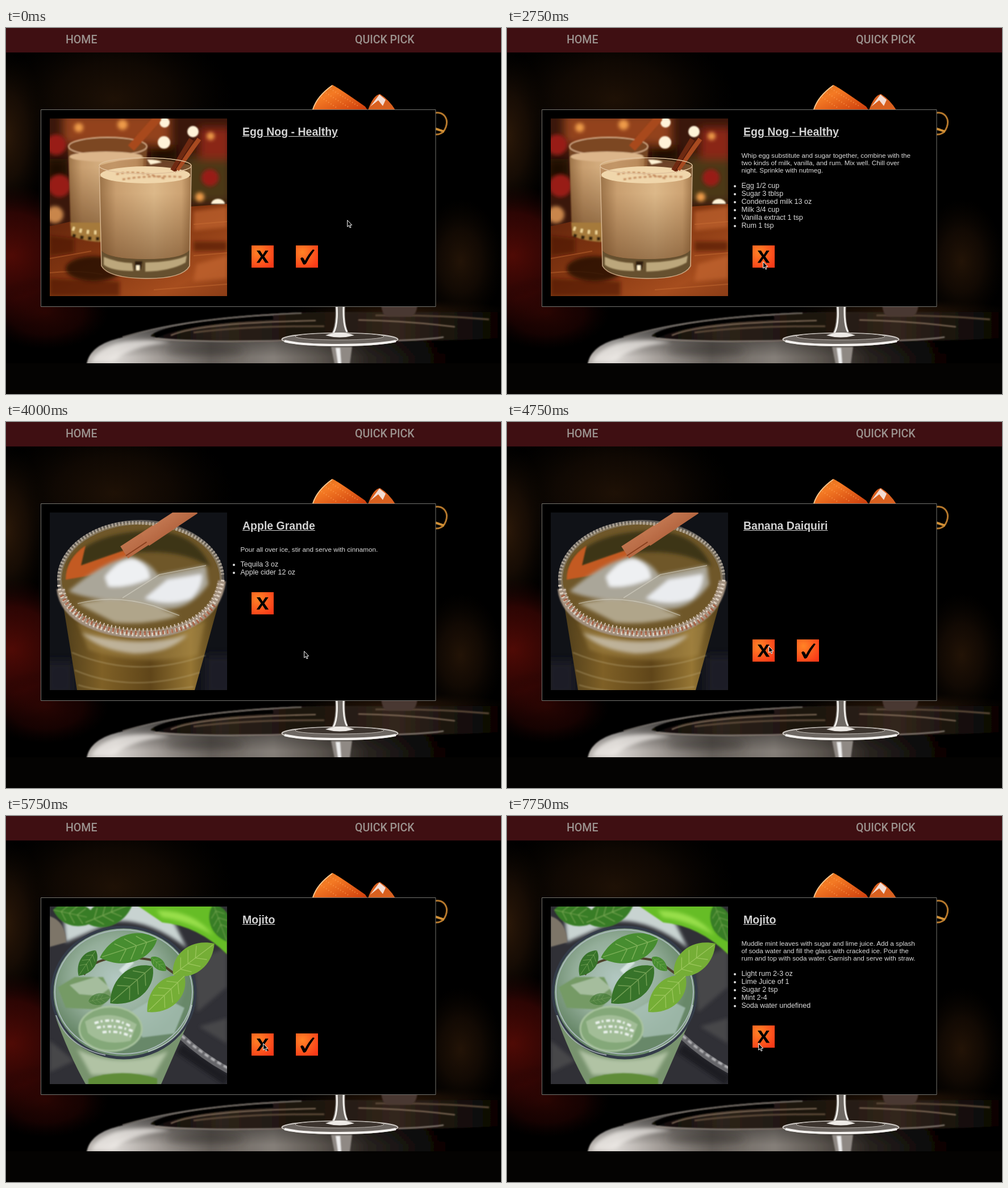
These frames come from a looping animation (871x643 px, 8000 ms). An HTML page:

```html
<!DOCTYPE html>
<html lang="en">
<head>
<meta charset="utf-8">
<title>Cocktail picker</title>
<style>
html, body { margin: 0; width: 100%; height: 100%; overflow: hidden; background: #000; }
#stage { position: relative; width: 871px; height: 643px; overflow: hidden; font-family: Arial, "Liberation Sans", sans-serif; color: #dcdcdc; }
svg { display: block; }
#cursor { position: absolute; left: 0; top: 0; overflow: visible; }
nav span { position: absolute; top: 9px; font: 500 19.5px/23px Roboto, sans-serif; color: #9b928e; white-space: nowrap; }
h2 { position: absolute; left: 416px; top: 171px; margin: 0; font-size: 19.5px; line-height: 22px; text-decoration: underline; color: #d2d2d2; white-space: nowrap; }
.recipe { position: absolute; left: 412.5px; top: 216.5px; white-space: nowrap; }
.recipe p { margin: 0 0 13.5px; font-size: 11.7px; line-height: 13.35px; }
.recipe ul { margin: 0; padding: 0; font-size: 12.5px; line-height: 14px; }

.anim { animation: 8s step-end infinite; }
.show { opacity: 0; }
.egg { animation-name: egg; }
.egg-recipe { animation-name: egg-recipe; }
.apple-pic { animation-name: apple-pic; }
.apple-title { animation-name: apple-title; }
.apple-recipe { animation-name: apple-recipe; }
.banana-pic { animation-name: banana-pic; }
.banana-title { animation-name: banana-title; }
.mojito { animation-name: mojito; }
.mojito-recipe { animation-name: mojito-recipe; }
.check { animation-name: check; }
.close { animation-name: close; }
#cursor { animation-name: cursor; }
@keyframes egg { 0% { opacity: 1 } 40.625% { opacity: 0 } }
@keyframes egg-recipe { 28.125% { opacity: 1 } 40.625% { opacity: 0 } }
@keyframes apple-pic { 40.625% { opacity: 1 } 62.5% { opacity: 0 } }
@keyframes apple-title { 40.625% { opacity: 1 } 56.25% { opacity: 0 } }
@keyframes apple-recipe { 50% { opacity: 1 } 56.25% { opacity: 0 } }
@keyframes banana-pic { 62.5% { opacity: 1 } 71.875% { opacity: 0 } }
@keyframes banana-title { 56.25% { opacity: 1 } 71.875% { opacity: 0 } }
@keyframes mojito { 71.875%, 100% { opacity: 1 } }
@keyframes mojito-recipe { 87.5%, 100% { opacity: 1 } }
@keyframes check {
  0%, 40.625%, 56.25% { opacity: 1 }
  28.125%, 50%, 87.5%, 100% { opacity: 0 }
}
@keyframes close {
  0%, 56.25% { transform: none }
  50% { transform: translateY(-83px) }
  87.5%, 100% { transform: translateY(-14px) }
}
@keyframes cursor {
  0% { transform: translate(600px, 337px) }
  3.125% { transform: translate(584px, 350px) }
  6.25% { transform: translate(540px, 378px) }
  9.375% { transform: translate(486px, 398px) }
  12.5% { transform: translate(455px, 406px) }
  18.75% { transform: translate(474px, 406px) }
  21.875% { transform: translate(510px, 407px) }
  25%, 28.125% { transform: translate(522px, 407px) }
  31.25% { transform: translate(447px, 409px) }
  34.375% { transform: translate(450px, 410px) }
  43.75% { transform: translate(492px, 406px) }
  46.875%, 50% { transform: translate(524px, 402px) }
  53.125% { transform: translate(470px, 340px) }
  56.25% { transform: translate(450px, 322px) }
  59.375% { transform: translate(460px, 393px) }
  62.5% { transform: translate(454px, 398px) }
  65.625% { transform: translate(452px, 399px) }
  75% { transform: translate(456px, 400px) }
  78.125% { transform: translate(478px, 401px) }
  81.25% { transform: translate(508px, 401px) }
  84.375%, 87.5% { transform: translate(525px, 401px) }
  90.625% { transform: translate(492px, 402px) }
  93.75% { transform: translate(452px, 400px) }
  96.875%, 100% { transform: translate(442px, 399px) }
}
</style>
</head>
<body>
<div id="stage">
<svg width="871" height="643" viewBox="0 0 871 643">
  <defs>
    <filter id="b1" x="-20%" y="-20%" width="140%" height="140%"><feGaussianBlur stdDeviation="1"/></filter>
    <filter id="b3" x="-60%" y="-60%" width="220%" height="220%"><feGaussianBlur stdDeviation="3"/></filter>
    <filter id="b8" x="-100%" y="-100%" width="300%" height="300%"><feGaussianBlur stdDeviation="8"/></filter>
    <radialGradient id="brown"><stop offset="0" stop-color="#2b1808"/><stop offset=".5" stop-color="#1a0e05" stop-opacity=".85"/><stop offset="1" stop-color="#0d0702" stop-opacity="0"/></radialGradient>
    <radialGradient id="red"><stop offset="0" stop-color="#4f0a05"/><stop offset=".6" stop-color="#370604" stop-opacity=".8"/><stop offset="1" stop-color="#1c0302" stop-opacity="0"/></radialGradient>
    <linearGradient id="silver">
      <stop offset="0" stop-color="#b5b0ab"/><stop offset=".07" stop-color="#d9d5d1"/><stop offset=".17" stop-color="#a39d98"/><stop offset=".3" stop-color="#68625d"/>
      <stop offset=".45" stop-color="#857f79"/><stop offset=".56" stop-color="#5b554f"/><stop offset=".68" stop-color="#28231f"/><stop offset=".84" stop-color="#080605"/><stop offset="1" stop-color="#000"/>
    </linearGradient>
    <linearGradient id="shade" x2="0" y2="1"><stop offset=".1" stop-opacity=".75"/><stop offset=".85" stop-opacity="0"/></linearGradient>
    <linearGradient id="tray">
      <stop offset="0" stop-color="#0b0705"/><stop offset=".2" stop-color="#2d231b"/><stop offset=".45" stop-color="#1b130d"/>
      <stop offset=".7" stop-color="#33261c"/><stop offset="1" stop-color="#050302"/>
    </linearGradient>
    <radialGradient id="orange" cx=".3" cy=".3" r=".85"><stop offset="0" stop-color="#ff8426"/><stop offset="1" stop-color="#fb3a18"/></radialGradient>
    <linearGradient id="peel" x2="1" y2="1"><stop offset="0" stop-color="#d8701c"/><stop offset=".35" stop-color="#f47a24"/><stop offset="1" stop-color="#cc3c0c"/></linearGradient>
    <linearGradient id="wood" y2="1"><stop offset="0" stop-color="#5e230c"/><stop offset=".45" stop-color="#833611"/><stop offset=".8" stop-color="#a64d1e"/><stop offset="1" stop-color="#8a3c16"/></linearGradient>
    <linearGradient id="nog"><stop offset="0" stop-color="#9c7348"/><stop offset=".18" stop-color="#c99f70"/><stop offset=".6" stop-color="#dcb889"/><stop offset=".9" stop-color="#cda373"/><stop offset="1" stop-color="#a47a4e"/></linearGradient>
    <linearGradient id="dusk" x2="0" y2="1"><stop offset=".2" stop-color="#5c3616" stop-opacity="0"/><stop offset="1" stop-color="#5c3616" stop-opacity=".5"/></linearGradient>
    <linearGradient id="stick" x2="1" y2="1"><stop offset="0" stop-color="#d28a62"/><stop offset="1" stop-color="#a4522e"/></linearGradient>
    <linearGradient id="cider"><stop offset="0" stop-color="#4d3c1a"/><stop offset=".25" stop-color="#7f6026"/><stop offset=".55" stop-color="#5f4519"/><stop offset=".8" stop-color="#967634"/><stop offset="1" stop-color="#463514"/></linearGradient>
    <linearGradient id="cream"><stop offset="0" stop-color="#d0b184"/><stop offset=".35" stop-color="#ecd8b2"/><stop offset="1" stop-color="#cfae80"/></linearGradient>
    <linearGradient id="plank"><stop offset="0" stop-color="#6f3a20"/><stop offset=".5" stop-color="#5a2a16"/><stop offset="1" stop-color="#7b4324"/></linearGradient>
    <radialGradient id="mint" cx=".45" cy=".4"><stop offset="0" stop-color="#b3c8c2"/><stop offset=".6" stop-color="#94ae9a"/><stop offset="1" stop-color="#688869"/></radialGradient>
    <pattern id="check-cloth" width="9" height="9" patternUnits="userSpaceOnUse" patternTransform="rotate(32)">
      <path fill="#e6f0f0" d="M0 0h9v9H0z"/><path fill="#69bccb" d="M0 0h4v4H0z"/>
    </pattern>
    <g id="leaf">
      <path fill="currentColor" d="M0 0C18-32 68-38 100 0C72 32 24 34 0 0Z"/>
      <path fill="none" stroke="#dff0a0" stroke-opacity=".35" stroke-width="1.5" d="M0 0H96M18 0l14-18M36 0l16-21M54 0l16-18M18 0l14 17M36 0l16 19M54 0l16 16"/>
    </g>
    <path id="button" fill="url(#orange)" d="M432 382h39v39h-39z"/>
  </defs>

  <!-- bar photo -->
  <g>
    <path d="M0 0h871v643H0z"/>
    <ellipse cx="190" cy="125" rx="210" ry="130" fill="url(#brown)" opacity=".7"/>
    <ellipse cx="0" cy="190" rx="75" ry="150" fill="url(#brown)"/>
    <ellipse cx="10" cy="400" rx="130" ry="125" fill="url(#red)"/>
    <ellipse cx="70" cy="500" rx="110" ry="65" fill="url(#red)" opacity=".5"/>
    <ellipse cx="800" cy="410" rx="75" ry="110" fill="url(#brown)" opacity=".8"/>
    <ellipse cx="690" cy="500" rx="200" ry="26" fill="url(#brown)"/>
    <g id="table" filter="url(#b1)">
      <path id="disc" fill="url(#silver)" d="M142 592C145 568 166 552 205 544C290 518 390 505 520 500L871 502V592Z"/>
      <use href="#disc" style="fill:url(#shade)"/>
      <path fill="url(#shade)" d="M142 592C145 568 166 552 205 544C290 518 390 505 520 500L871 502V592Z"/>
    </g>
    <path fill="#f0ece8" opacity=".7" filter="url(#b3)" d="M150 588Q160 561 210 551Q250 545 290 553Q220 558 186 588Z"/>
    <path fill="url(#tray)" filter="url(#b1)" d="M254 541C275 522 390 504 560 499H871V545Q740 552 560 549Q300 554 254 541Z"/>
    <g fill="none" filter="url(#b1)">
      <path stroke="#060302" stroke-width="9" d="M262 541C300 523 370 512 470 508"/>
      <path stroke="#8b7461" stroke-width="2" d="M290 540C330 523 420 517 545 514M620 513Q700 514 790 525"/>
      <path stroke="#5b4939" stroke-width="3" d="M330 535Q430 523 560 524M650 505Q740 503 850 512"/>
      <path stroke="#9a8f86" stroke-width="2" d="M262 546Q350 553 490 549M690 549Q740 547 770 543"/>
      <path stroke="#aaa199" stroke-width="2" opacity=".7" d="M205 543C290 518 390 506 520 501"/>
    </g>
    <ellipse cx="350" cy="567" rx="70" ry="9" fill="#2c2724" opacity=".45" filter="url(#b8)"/>
    <path fill="#4a3732" filter="url(#b1)" d="M660 486H724Q722 506 711 507H672Q662 506 660 486Z"/>
    <path fill="#6f6964" d="M579 488H597Q595 522 604 538H572Q581 522 579 488Z"/>
    <path stroke="#f3f0ec" stroke-width="3" fill="none" d="M582 489Q584 522 576 536M594 489Q593 522 600 534"/>
    <ellipse cx="587.5" cy="547" rx="102" ry="11" fill="#6d6762" stroke="#cfcac5" stroke-width="2"/>
    <ellipse cx="587" cy="542" rx="78" ry="6" fill="#3c342e" stroke="#bcb6b0"/>
    <path fill="#eeeae6" d="M562 540Q587 530 613 540Q587 547 562 540Z"/>
    <path stroke="#f5f2ef" stroke-width="4" fill="none" d="M490 550Q520 557 585 557T686 550"/>
    <path fill="#8f8984" filter="url(#b1)" d="M572 560H609L605 590H578Z"/>
    <path fill="#eee" filter="url(#b1)" d="M580 562h8l2 28h-6z"/>
    <path fill="url(#peel)" d="M539 144Q546 120 574 100Q579 101 632 138L636 144Z"/>
    <path stroke="#ff9d50" stroke-width="2" stroke-dasharray="1 4" fill="none" d="M571 107L621 138M563 114L604 140M555 122L583 141"/>
    <path stroke="#f6c58c" stroke-width="2" fill="none" d="M540 143Q547 120 574 101"/>
    <path fill="#d9601f" d="M637 144Q646 118 658 116Q674 126 685 144Z"/>
    <path fill="#f3dcd2" d="M641 138L657 117L668 126L663 137L655 127Z"/>
    <path fill="none" stroke="#b5782c" stroke-width="3" d="M756 149C771 147 779 160 774 174Q769 188 756 187"/>
    <path fill="none" stroke="#d08f35" stroke-width="4" d="M756 177L771 182"/>
    <path fill="#040302" d="M0 589h871v54H0z"/>
    <path fill="#3f0f12" d="M0 0h871v43H0z"/>
  </g>

  <path stroke="#74746f" d="M61.5 143.5h694.500v346H61.500z"/>

  <!-- egg nog -->
  <svg class="anim show egg" x="77" y="159" width="312" height="312" viewBox="77 159 312 312">
    <path fill="#3a170b" d="M77 159h312v312H77z"/>
    <g filter="url(#b8)">
      <path fill="#93431b" d="M100 150H290V205H100z"/>
      <path fill="#4c3713" d="M315 225H395V305H315z"/>
      <path fill="#8a2513" d="M340 175H395V230H340z"/>
      <path fill="#1f0b06" d="M70 230H108V270H70zM255 205H300V235H255z"/>
    </g>
    <g filter="url(#b3)">
      <g fill="#981c18"><circle cx="94" cy="277" r="20"/><circle cx="88" cy="205" r="18"/><circle cx="359" cy="263" r="15"/></g>
      <circle cx="86" cy="328" r="15" fill="#c9864c"/>
      <g fill="#ee9b48"><circle cx="128" cy="175" r="8"/><circle cx="205" cy="170" r="9"/><circle cx="360" cy="190" r="7"/><circle cx="341" cy="297" r="8"/></g>
    </g>
    <path fill="url(#wood)" d="M77 348Q110 342 170 325L389 309V471H77z"/>
    <g filter="url(#b3)">
      <path fill="#c4682f" opacity=".65" d="M330 322L389 314V350L330 356zM335 415L389 400V440L330 445z"/>
      <path fill="#4a1908" opacity=".6" d="M77 365L120 370V395L77 400zM77 440L200 445V471H77zM330 375H389V392H330z"/>
    </g>
    <path stroke="#cc7439" stroke-width="2" opacity=".4" fill="none" d="M77 405L150 392M77 430Q130 425 170 433M330 345L389 340M260 460L389 450M330 400L389 395"/>
    <g filter="url(#b1)" fill="#fff3d8"><circle cx="279" cy="166" r="9"/><circle cx="278" cy="201" r="11"/><circle cx="329" cy="182" r="10"/><path d="M361 309a12 9 0 0 1 24 0z"/></g>
    <ellipse cx="155" cy="423" rx="50" ry="22" fill="#220a04" opacity=".8" filter="url(#b3)"/>
    <g filter="url(#b1)">
      <path fill="#754524" d="M109 207Q176 179 249 207L238 360Q180 390 114 365Z"/>
      <path fill="url(#nog)" d="M110 226Q165 213 242 226L235 342H114Z"/>
      <path fill="url(#dusk)" d="M110 226Q165 213 242 226L235 342H114Z"/>
      <path fill="#a67a3a" d="M113 342H200V373Q150 381 115 365Z"/>
      <path stroke="#f0d698" stroke-width="7" stroke-dasharray="4 9" fill="none" d="M117 352Q150 364 200 356"/>
      <path stroke="#35200c" stroke-width="6" stroke-dasharray="6 8" fill="none" d="M117 364Q150 374 200 368"/>
      <ellipse cx="179" cy="208" rx="69" ry="16" fill="#7b4622" stroke="#d9b18b" stroke-width="2"/>
      <ellipse cx="176" cy="226" rx="64" ry="9" fill="#dcb58a"/>
      <path stroke="#a8481c" stroke-width="14" d="M220 211L268 157"/>
    </g>
    <path fill="#a97748" fill-opacity=".5" d="M163 242Q245 217 327 242L324 419Q314 440 245 441Q178 440 167 418Z"/>
    <path id="drink" fill="url(#nog)" d="M165 262H325L323 390Q312 406 246 406Q180 406 168 390Z"/>
    <path fill="url(#dusk)" d="M165 262H325L323 390Q312 406 246 406Q180 406 168 390Z"/>
    <ellipse cx="245" cy="258" rx="79" ry="15" fill="#f0d6ab"/>
    <path stroke="#a4582a" stroke-width="3" stroke-dasharray="5 4" opacity=".6" filter="url(#b1)" fill="none" d="M194 257Q230 248 280 265M205 266Q250 258 312 262"/>
    <path fill="#66502f" d="M168 391Q182 406 246 406Q310 406 323 390L322 419Q310 440 245 440Q180 438 168 418Z"/>
    <g filter="url(#b1)">
      <path fill="#d9c596" d="M172 402Q195 412 222 413L224 427Q187 427 172 416ZM245 412Q295 411 318 400L316 412Q290 427 245 428Z" opacity=".75"/>
      <path fill="#2f1e0c" d="M227 410h13l-3 14h-10z"/>
      <path fill="#fff1cf" d="M229 417h6v9h-6z"/>
    </g>
    <path stroke="#6f2a12" stroke-width="11" d="M294 251L327 196"/>
    <path stroke="#a84a20" stroke-width="8" d="M301 249L340 195"/>
    <path stroke="#4f1a0a" stroke-width="1.5" d="M297 250L334 193"/>
    <ellipse cx="245" cy="242" rx="81" ry="14" fill="none" stroke="#e0c19c" stroke-width="1.500"/>
    <path stroke="#f7dfc0" stroke-width="1.5" opacity=".6" fill="none" d="M164 244L168 418Q180 439 245 440T323 418L326 244"/>
    <path fill="#fff2d4" filter="url(#b1)" d="M248 231q20 0 26 5l-20 4z"/>
  </svg>

  <!-- cider -->
  <svg class="anim show apple-pic" x="77" y="159" width="312" height="312" viewBox="77 159 312 312">
    <path fill="#101217" d="M77 159h312v312H77z"/>
    <path fill="#1b1e26" filter="url(#b8)" d="M70 420H120V480H70zM350 410H400V480H350z"/>
    <path fill="url(#cider)" d="M98 305L125 471H332L382 290Z"/>
    <path fill="#a98b4b" opacity=".45" filter="url(#b3)" d="M125 350Q230 410 350 350L337 410Q235 430 145 400Z"/>
    <path fill="none" stroke="#c2b184" stroke-width="2" opacity=".4" filter="url(#b1)" d="M116 405Q230 453 351 410M121 436Q220 478 341 440M127 462Q200 484 330 465"/>
    <ellipse cx="237" cy="276" rx="143" ry="100" fill="#6f5729"/>
    <path fill="#3e3518" filter="url(#b3)" d="M110 250Q140 200 235 192T360 255Q310 224 235 229T112 272Z"/>
    <path fill="#c35a20" filter="url(#b1)" d="M105 277Q105 240 140 217L132 252L212 224L218 234L165 267Z"/>
    <g filter="url(#b3)">
      <path fill="#aaa699" d="M110 297Q170 246 218 236Q255 244 270 274L210 312Q150 315 110 297Z"/>
      <path fill="#eef0f2" d="M174 272Q200 238 227 241Q253 252 253 275Q215 292 180 289Z"/>
      <path fill="#aaa698" d="M203 311L270 268L352 252L356 285Q320 336 270 327Z"/>
      <path fill="#eaecef" d="M244 310L284 277L344 267Q348 287 326 310Q285 325 244 310Z"/>
      <path fill="#b0a58a" d="M126 319Q190 302 260 323L305 340Q250 358 190 352Z"/>
      <path fill="#cfc9bb" d="M133 370Q235 400 320 373Q290 407 225 407Q160 400 133 370Z" opacity=".75"/>
    </g>
    <path stroke="#d8d4c6" stroke-width="1.500" opacity=".6" fill="none" d="M205 309L270 268L352 252M126 319Q190 302 260 323L305 340"/>
    <path stroke="url(#stick)" stroke-width="25" d="M208 229L330 150"/>
    <path stroke="#89401f" stroke-width="2" d="M211 235L333 154"/>
    <g fill="none">
      <ellipse cx="237" cy="276" rx="143" ry="100" stroke="#8d8578" stroke-width="8" opacity=".65"/>
      <path stroke="#a3917f" stroke-width="14" filter="url(#b1)" d="M96 293C102 350 175 373 241 373S371 344 380 279"/>
      <path stroke="#dccfc0" stroke-width="6" stroke-dasharray="3 4" d="M93 286C100 348 175 374 241 374S374 341 382 274"/>
      <path stroke="#d6c6b4" stroke-width="5" stroke-dasharray="2 5" d="M101 294C110 342 178 365 241 365S362 340 374 284"/>
      <path stroke="#a9583a" stroke-width="7" stroke-dasharray="3 5" opacity=".8" d="M98 304C120 350 180 372 250 371S350 348 369 318"/>
      <path stroke="#c9bfb0" stroke-width="6" stroke-dasharray="3 3" opacity=".7" d="M93 278C91 225 153 177 225 177S374 206 381 268"/>
    </g>
    <path stroke="url(#stick)" stroke-width="25" d="M245 207L330 150"/>
  </svg>

  <!-- banana daiquiri -->
  <svg class="anim show banana-pic" x="77" y="159" width="312" height="312" viewBox="77 159 312 312">
    <path fill="url(#plank)" d="M77 159h312v312H77z"/>
    <path stroke="#3c190b" stroke-width="2" opacity=".7" d="M97 159L77 260M230 159L285 350M115 290L80 430"/>
    <path fill="url(#check-cloth)" d="M77 438L267 312L389 318V399L325 465L255 424L236 471H90Z"/>
    <path fill="#713819" d="M389 393V471H318Z"/>
    <g color="#2f5b2a">
      <use href="#leaf" transform="translate(238 393)rotate(-35)scale(1)"/>
      <use href="#leaf" transform="translate(315 410)rotate(14)scale(.9)"/>
      <use href="#leaf" transform="translate(75 460)rotate(-6)scale(.9)"/>
      <use href="#leaf" transform="translate(230 455)rotate(20)scale(.8)"/>
    </g>
    <ellipse cx="328" cy="392" rx="57" ry="39" fill="#5e7e56" stroke="#a9beaa" stroke-width="3"/>
    <ellipse cx="326" cy="384" rx="33" ry="20" fill="#8ca386"/>
    <path fill="#d8ddd2" d="M315 333H337L338 368Q350 385 326 389Q297 386 317 368Z"/>
    <path fill="url(#cream)" d="M266 159C268 205 253 226 253 264C253 314 291 337 325 337C360 337 389 312 395 270V159Z"/>
    <ellipse cx="336" cy="166" rx="69" ry="32" fill="#eee0c0" stroke="#e9e3d4" stroke-width="2"/>
    <path fill="#d8d849" d="M304 156Q312 188 340 181Q350 166 339 156Z"/>
    <path fill="#579d31" d="M293 156Q303 188 333 184L328 176Q310 178 307 156Z"/>
    <path stroke="#caa16b" stroke-width="4" d="M255 195L306 170"/>
    <g color="#4b9b31"><use href="#leaf" transform="translate(305 166)rotate(185)scale(.45)"/></g>
    <ellipse cx="190" cy="460" rx="61" ry="31" fill="#557a50" stroke="#9db69f" stroke-width="3"/>
    <path fill="#d9ddd4" d="M174 412H198V442Q222 460 186 466Q154 459 174 442Z"/>
    <path fill="url(#cream)" d="M108 232C121 273 104 296 104 340C104 390 143 419 183 419C231 419 261 389 261 348C261 304 239 285 247 236Z"/>
    <ellipse cx="178" cy="237" rx="70" ry="41" fill="#e7d4ab" stroke="#dcd6c6" stroke-width="3"/>
    <path fill="#f4e8cb" filter="url(#b3)" d="M145 247Q190 222 225 246Q205 275 160 267Z"/>
    <path stroke="#c8a46d" stroke-width="5" d="M88 270L230 179"/>
    <circle cx="169" cy="207" r="35" fill="#e4cc3e"/>
    <circle cx="166" cy="204" r="27" fill="#f2e696"/>
    <path fill="#428b26" d="M106 213Q145 187 174 216Q191 234 185 253Q153 252 106 213Z"/>
    <path fill="#aac967" d="M116 215Q145 201 166 221Q178 235 178 246Q148 240 116 215Z"/>
    <g color="#3e9630">
      <use href="#leaf" transform="translate(121 236)rotate(203)scale(.5)"/>
      <use href="#leaf" transform="translate(120 237)rotate(6)scale(.47)"/>
      <use href="#leaf" transform="translate(117 242)rotate(-68)scale(.29)"/>
    </g>
    <path fill="none" stroke="#d1ad72" stroke-width="4" d="M96 257q-10 30 3 33q11-14 0-34M260 193q-10 9 0 14q10-7 7-17"/>
  </svg>

  <!-- mojito -->
  <svg class="anim show mojito" x="77" y="159" width="312" height="312" viewBox="77 159 312 312">
    <path fill="#303036" d="M77 159h312v312H77z"/>
    <path fill="#47464a" filter="url(#b3)" d="M330 255L389 230V300L336 345zM340 370L389 355V400zM77 395L120 430L77 450z"/>
    <path fill="#c8d3d1" filter="url(#b3)" d="M100 155H280L318 232Q250 180 190 185L105 222z"/>
    <path fill="#66bd25" filter="url(#b1)" d="M228 155H370L389 215V243Q338 193 275 187Z"/>
    <path fill="#99df4b" filter="url(#b3)" d="M265 166Q330 165 365 210Q320 184 275 178Z"/>
    <path fill="#7d7568" filter="url(#b1)" d="M77 176Q105 185 106 222L77 230Z"/>
    <g color="#397d25" filter="url(#b1)">
      <use href="#leaf" transform="translate(83 165)rotate(12)scale(.8)"/>
      <use href="#leaf" transform="translate(140 187)rotate(-22)scale(.9)"/>
      <use href="#leaf" transform="translate(365 155)rotate(70)scale(.7)"/>
    </g>
    <path stroke="#1e1e22" stroke-width="18" filter="url(#b3)" d="M305 408L389 465"/>
    <path stroke="#66666a" stroke-width="11" d="M307 386Q345 422 391 447" fill="none"/>
    <path stroke="#b5b5b8" stroke-width="4" stroke-dasharray="8 5" filter="url(#b1)" d="M309 386Q345 419 391 443" fill="none"/>
    <path fill="#78936e" d="M86 350Q110 418 140 471H273L326 350Z"/>
    <path fill="#b1c3a4" filter="url(#b3)" d="M125 410Q200 445 285 413L260 455H150Z"/>
    <path fill="#5f8c38" filter="url(#b1)" d="M145 462Q200 442 266 461V475H145Z"/>
    <ellipse cx="207" cy="310" rx="126" ry="115" fill="url(#mint)" stroke="#343c49" stroke-width="5"/>
    <ellipse cx="207" cy="309" rx="121" ry="109" fill="none" stroke="#a9b9b9" stroke-width="2"/>
    <g filter="url(#b1)">
      <path fill="#759a65" d="M91 301L121 283H171L187 316L162 340L105 337Z"/>
      <path fill="#b9ccb5" opacity=".7" d="M112 297L160 282L183 302L164 316L129 313Z"/>
      <path fill="#a8c1b6" opacity=".8" d="M218 345L270 315L314 337L296 382L240 389Z"/>
      <ellipse cx="184" cy="374" rx="55" ry="39" fill="#84a879" stroke="#a9c39f" stroke-width="3"/>
      <path fill="#a2bd97" d="M139 361Q182 336 230 366L219 395Q170 405 144 381Z"/>
      <path stroke="#eef5f0" stroke-width="4" stroke-dasharray="7 4 3 5" fill="none" d="M156 364Q190 352 220 370M160 372Q190 365 226 379M170 380Q195 376 220 387"/>
      <path stroke="#e1eeeb" stroke-width="9" opacity=".8" d="M202 274L222 255"/>
    </g>
    <path fill="none" stroke="#4d422c" stroke-width="4" d="M137 279C155 247 195 247 235 250S276 265 300 279"/>
    <g color="#37732a">
      <use href="#leaf" transform="translate(158 236)rotate(124)scale(.54)"/>
      <use href="#leaf" transform="translate(145 326)rotate(-12)scale(.4)" opacity=".6"/>
      <use href="#leaf" transform="translate(258 264)rotate(139)scale(.99)"/>
    </g>
    <g color="#478d30">
      <use href="#leaf" transform="translate(266 216)rotate(162)scale(1.06 .95)"/>
      <use href="#leaf" transform="translate(255 248)rotate(42)scale(.36)"/>
    </g>
    <g color="#75ae36">
      <use href="#leaf" transform="translate(294 279)rotate(-37)scale(.91)"/>
      <use href="#leaf" transform="translate(314 281)rotate(136)scale(.91)"/>
    </g>
    <path fill="none" stroke="#e2eceb" stroke-width="2" opacity=".6" d="M88 350Q109 407 175 420M250 414Q315 392 327 332"/>
  </svg>

  <g class="anim close">
    <use href="#button"/>
    <path d="M441 391h6l4.700 7.500 4.700-7.500h5.300l-7.200 10.500 7.700 11h-6l-5-7.800-5.200 7.800h-5.200l7.800-11z"/>
  </g>
  <g class="anim check">
    <use href="#button" x="78"/>
    <path d="M518 405q3-4 6 0l2 4Q532 397 540 389l3 1Q534 402 528 414q-3 3-5 1z"/>
  </g>
</svg>

<nav><span style="left:105px">HOME</span><span style="left:614px">QUICK PICK</span></nav>

<h2 class="anim show egg">Egg Nog - Healthy</h2>
<h2 class="anim show apple-title">Apple Grande</h2>
<h2 class="anim show banana-title">Banana Daiquiri</h2>
<h2 class="anim show mojito">Mojito</h2>

<div class="recipe anim show egg-recipe">
  <p>Whip egg substitute and sugar together, combine with the<br>two kinds of milk, vanilla, and rum. Mix well. Chill over<br>night. Sprinkle with nutmeg.</p>
  <ul><li>Egg 1/2 cup<li>Sugar 3 tblsp<li>Condensed milk 13 oz<li>Milk 3/4 cup<li>Vanilla extract 1 tsp<li>Rum 1 tsp</ul>
</div>
<div class="recipe anim show apple-recipe">
  <p>Pour all over ice, stir and serve with cinnamon.</p>
  <ul><li>Tequila 3 oz<li>Apple cider 12 oz</ul>
</div>
<div class="recipe anim show mojito-recipe">
  <p>Muddle mint leaves with sugar and lime juice. Add a splash<br>of soda water and fill the glass with cracked ice. Pour the<br>rum and top with soda water. Garnish and serve with straw.</p>
  <ul><li>Light rum 2-3 oz<li>Lime Juice of 1<li>Sugar 2 tsp<li>Mint 2-4<li>Soda water undefined</ul>
</div>

<svg id="cursor" class="anim" width="10" height="16">
  <path d="M.7.7V12.200L3.300 9.800 5.200 14 7 13.200 5.200 9.200H8.700Z" stroke="#fff"/>
</svg>
</div>
</body>
</html>
```
